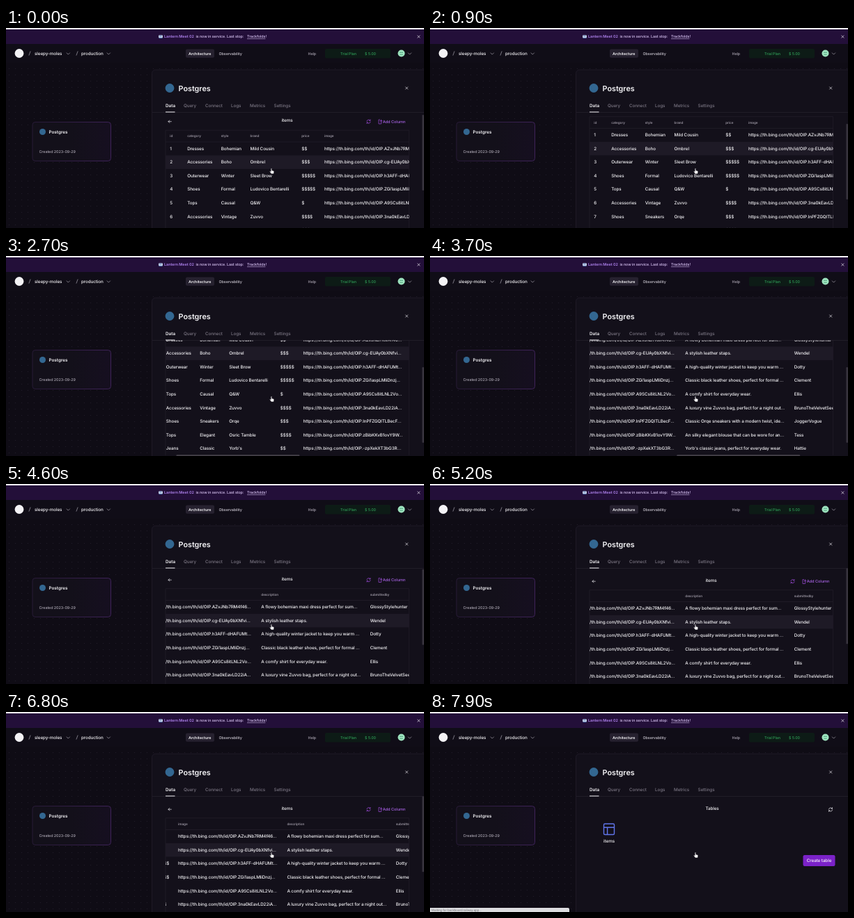
These frames come from a looping animation (600x288 px, 8 s). An HTML page:

```html
<!DOCTYPE html>
<html lang="en">
<head>
<meta charset="utf-8">
<title>Database panel</title>
<style>
  @property --sx { syntax: "<length>"; inherits: true; initial-value: 0px; }
  @property --sy { syntax: "<length>"; inherits: true; initial-value: 0px; }

  html, body { margin: 0; width: 100%; height: 100%; overflow: hidden; background: #0f0c15; }
  svg { display: block; width: 600px; height: 288px; }
  text {
    font: 500 6.3px Inter, "Liberation Sans", sans-serif; letter-spacing: -.015em;
    fill: #f6f5f8; text-rendering: geometricPrecision; white-space: pre;
  }
  .small { font-size: 5.4px; }
  .head { font-size: 4.7px; font-weight: 600; fill: #98939f; }
  .bold { font-weight: 600; letter-spacing: 0; }
  .title { font-size: 10.8px; }
  .center { text-anchor: middle; }
  .dim { fill: #7b7683; }
  .soft { fill: #aaa5b1; }
  .lilac { fill: #d9c4f3; }
  .green { fill: #2f9a56; }
  .violet { fill: #a763e3; }
  .status { font: 4.7px Roboto, "Liberation Sans", sans-serif; fill: #77777c; }
  .line { fill: none; stroke: #eeecf2; stroke-width: .7; stroke-linecap: round; stroke-linejoin: round; }
  .line.violet { stroke: #a24ee0; fill: none; }
  .line.soft { stroke: #aaa5b1; fill: none; }

  #browser { animation: scrollX 8s infinite, scrollY 8s infinite, leave 8s step-end infinite; }
  #down { transform: translateY(calc(var(--sy) * -1)); }
  #across { transform: translateX(calc(var(--sx) * -1)); }
  #barX { transform: translateX(calc(var(--sx) * .507)); }
  #barY { transform: translateY(calc(var(--sy) * .66)); }
  #tables { visibility: hidden; animation: enter 8s step-end infinite; }
  #status { visibility: hidden; animation: wait 8s step-end infinite; }

  @keyframes scrollY {
    0%, 1% { --sy: 0px; animation-timing-function: ease-in-out; }
    21.5%, 23.75% { --sy: 39px; animation-timing-function: ease-in-out; }
    30%, 46.25% { --sy: 53px; animation-timing-function: ease-in-out; }
    56.25%, 58% { --sy: -3.5px; animation-timing-function: ease-out; }
    63%, 100% { --sy: -5.5px; }
  }
  @keyframes scrollX {
    0%, 30.5% { --sx: 0px; animation-timing-function: ease-in; }
    33.75% { --sx: 30px; animation-timing-function: ease-out; }
    45%, 67% { --sx: 247px; animation-timing-function: ease-in-out; }
    74.5%, 81.25% { --sx: 339px; animation-timing-function: ease-in-out; }
    90%, 100% { --sx: 0px; }
  }
  @keyframes leave { 0% { visibility: visible; } 93.75%, 100% { visibility: hidden; } }
  @keyframes enter { 0% { visibility: hidden; } 93.75%, 100% { visibility: visible; } }
  @keyframes wait { 0% { visibility: hidden; } 92.5%, 100% { visibility: visible; } }
</style>
</head>
<body>
<svg viewBox="0 0 600 288">
  <defs>
    <pattern id="dots" width="9" height="9" patternUnits="userSpaceOnUse">
      <circle cx="4.5" cy="4.5" r=".6" fill="#241e2c"/>
    </pattern>
    <linearGradient id="cardFill">
      <stop offset=".5" stop-color="#13101a"/><stop offset="1" stop-color="#160f20"/>
    </linearGradient>
    <linearGradient id="cardEdge">
      <stop offset="0" stop-color="#291b39"/><stop offset="1" stop-color="#43255f"/>
    </linearGradient>
    <clipPath id="view"><rect x="210" y="121.5" width="390" height="166.5"/></clipPath>
    <clipPath id="grid"><rect x="229" y="100" width="349.5" height="260"/></clipPath>
    <path id="chevron" d="M-2.2-1.1 0 1.1 2.2-1.1"/>
    <path id="cross" d="M-1.6-1.6 1.6 1.6M1.6-1.6-1.6 1.6"/>
    <path id="reload" d="M-2.6-.4A2.7 2.7 0 0 1 2.2-1.5M2.6.4A2.7 2.7 0 0 1-2.2 1.5M2.5-2.8V-1.3H1M-2.5 2.8V1.3H-1"/>
  </defs>

  <!-- canvas -->
  <rect width="600" height="288" fill="#0f0c15"/>
  <rect y="50" width="600" height="238" fill="url(#dots)"/>
  <rect x="38" y="135.5" width="112.5" height="56" rx="4" fill="url(#cardFill)" stroke="url(#cardEdge)" stroke-width=".9"/>
  <circle cx="52.5" cy="149.5" r="4.5" fill="#336791"/>
  <text class="bold" x="61.5" y="151.8">Postgres</text>
  <text class="small soft" x="47.5" y="179.5">Created 2023-09-29</text>

  <!-- banner -->
  <rect width="600" height="23" fill="#230f39"/>
  <rect width="600" height="2" fill="#f4f3f6"/>
  <rect x="219" y="10.2" width="6" height="4" rx="1.2" fill="#c8d2e6"/>
  <path d="M220 11.4h3.6M219.5 14.4h5" stroke="#4b76b8" stroke-width=".9"/>
  <text class="small bold" x="227" y="14.4" style="fill:#b184f0">Lantern Meet 02</text>
  <text class="small lilac" x="272.5" y="14.4">is now in service. Last stop:</text>
  <text class="small lilac" x="346" y="14.4"><tspan text-decoration="underline">Trackfolds</tspan>!</text>
  <use href="#cross" x="592.4" y="12.5" class="line"/>

  <!-- navigation -->
  <rect y="23" width="600" height="27" fill="#100d17"/>
  <circle cx="19" cy="36.5" r="6.4" fill="#f3f2f5"/>
  <path class="line soft" d="M33 39.2 35 33.8M101 39.2 103 33.8"/>
  <text x="41" y="38.8">sleepy-moles</text>
  <text x="108" y="38.8">production</text>
  <g class="line soft">
    <use href="#chevron" x="89.3" y="37"/>
    <use href="#chevron" x="147.3" y="37"/>
    <use href="#chevron" x="579.5" y="37"/>
  </g>
  <rect x="258" y="30.5" width="41" height="12.2" rx="2" fill="#26212f"/>
  <text class="small bold" x="262" y="38.5">Architecture</text>
  <text class="small" x="305.5" y="38.5" style="fill:#cbc7d1">Observability</text>
  <text class="small soft" x="433.5" y="38.5">Help</text>
  <rect x="458" y="30" width="94" height="13.5" rx="2" fill="#0d1b16"/>
  <text class="small green" x="480" y="38.5">Trial Plan</text>
  <text class="small green" x="515" y="38.5">$ 5.00</text>
  <circle cx="567.5" cy="36.5" r="5" fill="#9fe5c0"/>
  <path d="M565 35.2h5M565.3 38.3h4.4" stroke="#4f9f7b" stroke-width="1"/>

  <!-- panel -->
  <path d="M601 60.2H214.5a5 5 0 0 0-5 5V289H601Z" fill="#13101a" stroke="#231e2a" stroke-width=".8"/>
  <circle cx="235" cy="86.5" r="6.4" fill="#336791"/>
  <text class="title bold" x="247.5" y="90.5">Postgres</text>
  <use href="#cross" x="575.2" y="86.5" class="line"/>
  <g id="tabs"></g>
  <path d="M210 121.5H600" stroke="#28232f" stroke-width=".7"/>

  <g id="browser">
    <g clip-path="url(#view)">
      <g id="down">
        <path class="line" d="M237.3 134.7H233M234.8 132.9 233 134.7 234.8 136.5"/>
        <text class="center" x="403.5" y="135.3">items</text>
        <use href="#reload" x="520.5" y="134.7" class="line violet"/>
        <path class="line violet" d="M536.4 132H535V138H538.6V135.4M537 133.7H540M538.5 132.2V135.2"/>
        <text class="violet" x="540.7" y="136.8" style="font-size:5.7px">Add Column</text>
        <path d="M229 340V147.2H578.6V340M229 164H578.6" fill="none" stroke="#25202b" stroke-width=".7"/>
        <rect x="229" y="183.4" width="349.5" height="19.5" fill="#1e1a26"/>
        <g clip-path="url(#grid)"><g id="across"></g></g>
        <rect id="barX" x="229" y="339.2" width="177" height="2.4" rx="1.2" fill="#45414a"/>
      </g>
    </g>
    <rect id="barY" x="597.4" y="125" width="2.6" height="109" rx="1.2" fill="#38343e"/>
  </g>

  <g id="tables">
    <text class="center" x="405" y="141.2">Tables</text>
    <use href="#reload" x="575" y="140.5" class="line"/>
    <path d="M251 161H263a1.5 1.5 0 0 1 1.5 1.5V175a1.5 1.5 0 0 1-1.5 1.5H251a1.5 1.5 0 0 1-1.5-1.5V162.5A1.5 1.5 0 0 1 251 161ZM249.5 166.2H264.5M254.6 166.2V176.5" fill="none" stroke="#6075ea" stroke-width="1.4"/>
    <text class="center" x="257" y="187.7">items</text>
    <rect x="535.5" y="206" width="46" height="16" rx="2.2" fill="#7b22c8"/>
    <text class="center" x="558.5" y="216.3">Create table</text>
  </g>

  <path d="M229 121H242.5" stroke="#f4f3f6" stroke-width="1"/>

  <g id="status">
    <path d="M0 282H198a2 2 0 0 1 2 2V288H0Z" fill="#dddde0"/>
    <text class="status" x="2" y="287.2">Waiting for backboard.railway.app...</text>
  </g>

  <!-- pointer -->
  <path d="M380.2 202.4q.9-.9 1.5.1v2.6l2.3.6q.9.4.8 1.4l-.6 2.8h-3.5l-2.2-3.1q-.3-1 .6-.9l1.1.8Z"
        fill="#fff" stroke="#17131d" stroke-width=".5"/>
</svg>

<script>
  const NS = "http://www.w3.org/2000/svg";
  const PITCH = 19.55;

  function label(parent, x, y, words, style = "") {
    const el = document.createElementNS(NS, "text");
    el.setAttribute("x", x);
    el.setAttribute("y", y);
    el.setAttribute("class", style);
    el.textContent = words;
    parent.append(el);
  }

  const tabs = { Data: 229, Query: 255, Connect: 286, Logs: 323, Metrics: 350, Settings: 384.5 };
  for (const [name, x] of Object.entries(tabs))
    label(document.getElementById("tabs"), x, 114.3, name, name === "Data" ? "bold" : "dim");

  const columns = {
    id: 235.3, category: 260.2, style: 308.7, brand: 350.6, price: 424.2,
    image: 457, description: 613.3, submittedby: 769.7, submittedon: 846.3
  };

  // category | style | brand | price level | image id | description | author | date
  const rows = `
Dresses|Bohemian|Mild Cousin|2|AZvJNb7RM4f46|A flowy bohemian maxi dress perfect for sum...|GlossyStylehunter|2022-09-04 10:48:00
Accessories|Boho|Ombrel|3|cg-EUAy0bXNfvi|A stylish leather staps.|Wendel|2023-01-01 09:48:00
Outerwear|Winter|Sleet Brow|5|h3AFF-dHAFUMt|A high-quality winter jacket to keep you warm ...|Dotty|2011-10-10 10:48:00
Shoes|Formal|Ludovico Bentarelli|5|ZGi1aspLMliDnzj|Classic black leather shoes, perfect for formal ...|Clement|2023-01-10 09:48:00
Tops|Causal|Q&W|1|A9SCs8itLNL2Vo|A comfy shirt for everyday wear.|Ellis|2023-03-10 00:23:00
Accessories|Vintage|Zuvvo|4|3na0kEavLD22iA|A luxury vine Zuvvo bag, perfect for a night out...|BrunoTheVelvetSeeker|2022-09-13 07:01:00
Shoes|Sneakers|Orqe|3|lnPFZGQITLBecF|Classic Orqe sneakers with a modern twist, ide...|JoggerVogue|2022-11-02 08:15:00
Tops|Elegant|Osric Tamble|4|zBibKKvB1ovY9W|An silky elegant blouse that can be wore for an...|Tess|2023-02-14 12:30:00
Jeans|Classic|Yorb's|2|-zpXekXT3bG3R|Yorb's classic jeans, perfect for everyday wear.|Hattie|2023-04-21 16:05:00
`.trim().split("\n").map(row => row.split("|"));

  const sheet = document.getElementById("across");
  const xs = Object.values(columns);
  Object.keys(columns).forEach((name, i) => label(sheet, xs[i], 157.2, name, "head"));
  rows.forEach(([category, style, brand, level, image, ...rest], n) => {
    const cells = [n + 1, category, style, brand, "$".repeat(level),
      `https://th.bing.com/th/id/OIP.${image}...`, ...rest];
    cells.forEach((cell, i) => label(sheet, xs[i], 175.8 + n * PITCH, cell));
  });
</script>
</body>
</html>
```
